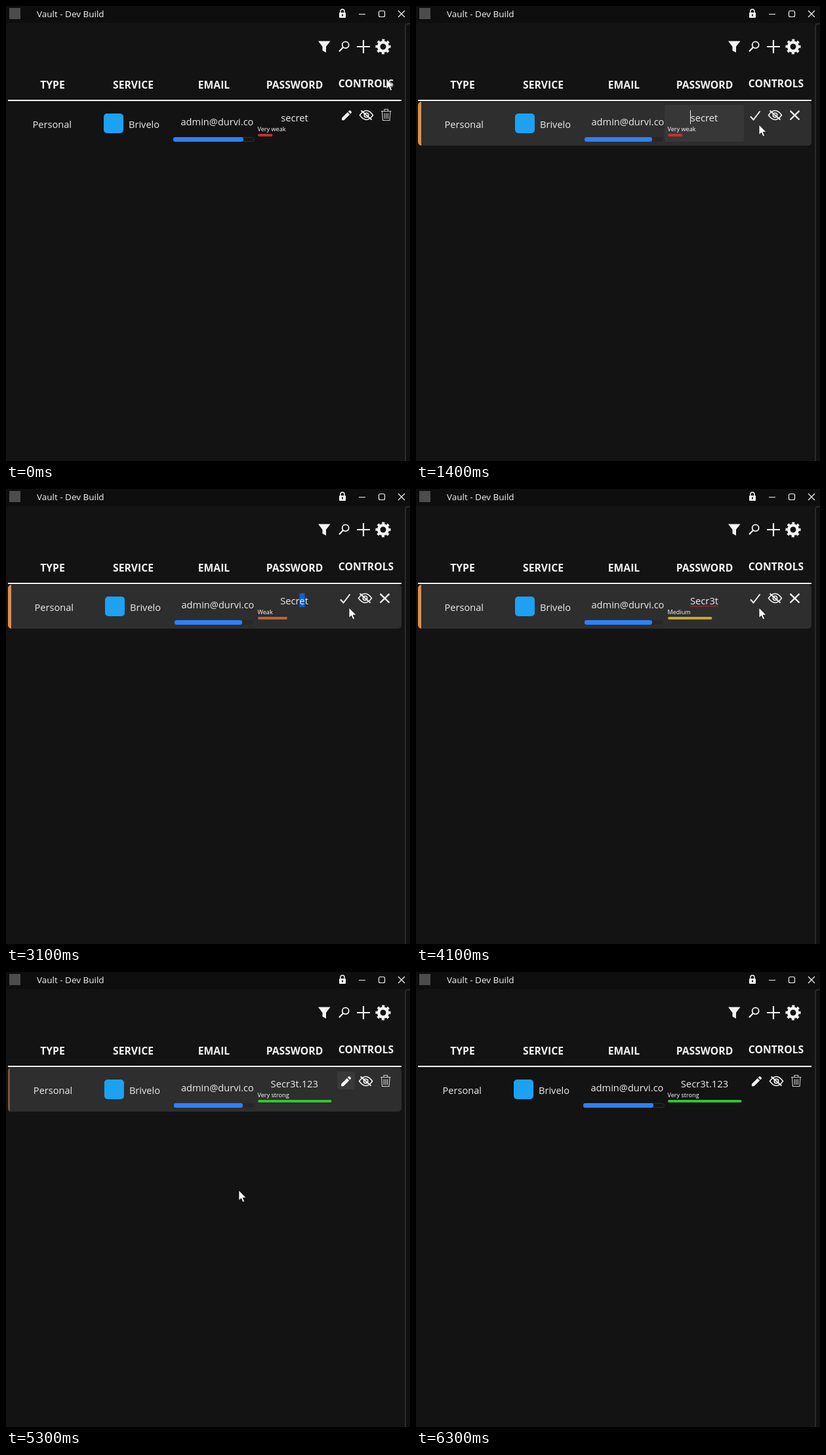
An HTML page for the animation above (6500 ms loop, 616 px wide and 694 px high).

```html
<!DOCTYPE html>
<html lang="en">
<head>
<meta charset="utf-8">
<title>Vault</title>
<style>
html, body { margin: 0; width: 100%; height: 100%; overflow: hidden; background: #131313; }
svg { display: block; width: 616px; height: 694px; font-family: "Open Sans", "Noto Sans", sans-serif; font-size: 14.6px; fill: #ececec; }
.head { font-weight: 700; font-size: 15.7px; fill: #f4f4f4; text-anchor: middle; }
.line { fill: none; stroke: #f4f4f4; }
.thin { fill: none; stroke: #cfcfcf; stroke-width: 1.1; }
</style>
</head>
<body>
<svg viewBox="0 0 616 694" xmlns="http://www.w3.org/2000/svg">
  <defs>
    <linearGradient id="blue" x1="0" y1="0" x2="1" y2="1">
      <stop offset="0" stop-color="#3b74e8"/><stop offset="1" stop-color="#0d45b8"/>
    </linearGradient>
    <clipPath id="cell"><rect x="255" y="160" width="124" height="36"/></clipPath>
  </defs>
  <rect width="616" height="694" fill="#131313"/>
  <rect width="616" height="26" fill="#0e0e0e"/>
  <rect x="609" y="27" width="14" height="690" rx="4" fill="#101010" stroke="#2a2a2a" stroke-width="2"/>

  <!-- title bar -->
  <rect x="5" y="3" width="17" height="17" fill="#4c4c4c"/>
  <text id="title" x="47" y="17" font-size="13.5" fill="#f4f4f4"></text>
  <path class="line" stroke-width="1.5" d="M510 11V8a3 3 0 0 1 6 0V11"/>
  <rect x="508" y="10" width="10" height="8" rx="1" fill="#f4f4f4"/>
  <path d="M513 12.5v3" stroke="#0e0e0e" stroke-width="1.8"/>
  <path class="line" stroke-width="1.2" d="M538 12.5H548M598 7l10 10m0-10l-10 10"/>
  <rect class="line" x="568.5" y="7.5" width="9" height="9" rx="2" stroke-width="1.2"/>

  <!-- toolbar -->
  <path fill="#f4f4f4" d="M476 53.5H494.5L488 62V71L482.5 68V62Z"/>
  <circle class="line" cx="517.7" cy="59.3" r="5" stroke-width="1.8"/>
  <path class="line" stroke-width="2.2" d="M514 63L508 69.3M535 62H555M545 52V72"/>
  <circle class="line" cx="575" cy="62" r="6.8" stroke-width="4.6"/>
  <circle class="line" cx="575" cy="62" r="9.7" stroke-width="3.8" stroke-dasharray="3.81" transform="rotate(-11.2 575 62)"/>

  <!-- table head -->
  <g class="head">
    <text x="71" y="126">TYPE</text>
    <text x="194" y="126">SERVICE</text>
    <text x="317" y="126">EMAIL</text>
    <text x="440" y="126">PASSWORD</text>
    <text x="549" y="124">CONTROLS</text>
  </g>
  <rect x="3" y="143" width="600" height="2" fill="#fff"/>

  <!-- row -->
  <g id="hover">
    <rect x="3" y="146" width="600" height="67" rx="5" fill="#2e2e2e"/>
    <path id="edge" fill="#d98f52"/>
  </g>
  <rect id="field" x="379" y="151" width="121" height="56" rx="4" fill="#373737"/>
  <text id="type" y="186">Personal</text>
  <g id="service">
    <rect x="149" y="164" width="30" height="30" rx="5" fill="#1da1f2"/>
    <text x="187" y="186">Brivelo</text>
  </g>
  <g clip-path="url(#cell)"><text id="mail" y="182">admin@durvi.co</text></g>
  <rect id="track" y="200.5" height="6" rx="3"/>
  <rect id="fill" y="200" height="7" rx="3" fill="#2e80fa"/>
  <rect id="pick" y="159" height="21" fill="#0c62d4"/>
  <text id="pass" y="176" font-size="14.8" text-anchor="middle"></text>
  <path id="wavy" d="M418 178.7H461" stroke="#b5202c" stroke-width="1.3"/>
  <rect id="caret" y="159" width="1" height="21" fill="#f4f4f4"/>
  <text id="label" x="383.5" y="191" font-size="9.1" font-weight="500" fill="#fff"></text>
  <rect id="power" x="384" y="195" height="4" rx="2"/>

  <!-- row controls -->
  <g id="tools">
    <rect id="press" x="506" y="152" width="27" height="27" rx="4" fill="#393939"/>
    <path class="line" stroke-width="1.6" d="M539.5 166.5Q549.5 152.5 559.5 166.5Q549.5 180.5 539.5 166.5Z"/>
    <circle class="line" cx="549.5" cy="166.5" r="3.2" stroke-width="1.6"/>
    <path class="line" stroke-width="1.8" d="M541.5 159.5L557.5 173.5"/>
    <g id="view">
      <path fill="#f6f6f6" d="M512 174.2V170.8L520.8 162L524.2 165.4L515.4 174.2ZM521.8 161L523.4 159.4Q524.2 158.8 525 159.4L526.8 161.2Q527.4 162 526.8 162.8L525.2 164.4Z"/>
      <path class="thin" d="M572 160.5H587.5M577 160V157.5H582.5V160M573.5 161L574.5 174.5H585L586 161M577.2 163.5V172M579.8 163.5V172M582.4 163.5V172"/>
    </g>
    <g id="edit" class="line">
      <path stroke-width="2" d="M512 168.5L516.5 173.5L526.5 160.5"/>
      <path stroke-width="2.4" d="M572.5 159.8L586.5 173.5M586.5 159.8L572.5 173.5"/>
    </g>
  </g>

  <g id="save">
    <rect x="20" y="646" width="100" height="30" rx="4" fill="url(#blue)"/>
    <text x="70" y="665.5" text-anchor="middle" font-family="Liberation Sans, Arial, sans-serif" font-size="13.3" fill="#e4ebfa">Save</text>
  </g>
  <path id="arrow" d="M0 0V15.5L3.6 12.2L6 18L8.6 17L6.2 11.3H11Z" fill="#fff" stroke="#111" stroke-width=".8"/>
  <path id="beam" class="line" stroke-width="1.2" d="M-3 -8H3M0 -8V8M-3 8H3"/>
</svg>
<script>
const LOOP = 6500, STEP = 100;
const el = {};
document.querySelectorAll('[id]').forEach(n => el[n.id] = n);

const set = (n, o) => { for (const k in o) n.setAttribute(k, o[k]); };
const show = (n, on) => set(n, { visibility: on ? 'visible' : 'hidden' });
const move = (n, x, y = 0) => set(n, { transform: `translate(${x} ${y})` });
const within = (t, a, b) => t >= a && t < b;
const ramp = (t, a, b) => Math.min(1, Math.max(0, (t - a) / (b - a)));

// pointer trips between the places it visits
const home = { x: 580, y: 111 };
const trips = [
  { from: 0, to: 400, x: 520, y: 170 },     // pencil
  { from: 700, to: 1100, x: 391, y: 170 },  // password field
  { from: 1200, to: 1400, x: 523, y: 181 }, // below the check mark
  { from: 4800, to: 5000, x: 521, y: 170 }, // check mark
  { from: 5100, to: 5300, x: 355, y: 333 },
  { from: 5300, to: 5600, x: 63, y: 597 },
  { from: 5600, to: 5800, x: 64, y: 655 },  // save button
  { from: 5900, to: 6200, x: -20, y: 630 }
];

function pointer(t) {
  return trips.reduce((p, s) => {
    const f = ramp(t, s.from, s.to);
    return { x: p.x + (s.x - p.x) * f, y: p.y + (s.y - p.y) * f };
  }, home);
}

// what is in the password field, with its caret or selected letter
const edits = [
  { at: 0, word: 'secret' },
  { at: 1200, word: 'secret', caret: 0 },
  { at: 1800, word: 'secret', pick: 0 },
  { at: 1900, word: 'Secret', caret: 1 },
  { at: 2400, word: 'Secret' },
  { at: 2600, word: 'Secret', caret: 3 },
  { at: 2700, word: 'Secret', pick: 4 },
  { at: 3200, word: 'Secr3t', caret: 5 },
  { at: 3600, word: 'Secr3t' },
  { at: 4200, word: 'Secr3t.1', caret: 8 },
  { at: 4300, word: 'Secr3t.123', caret: 10 },
  { at: 4900, word: 'Secr3t.123' }
];
const grades = ['Very weak', 'Weak', 'Medium', 'Strong', 'Very strong'];

// one point for each kind of character, one for length
const score = w => [/[a-z]/, /[A-Z]/, /\d/, /\W/, /.{10}/].filter(r => r.test(w)).length;

const meter = t => edits.reduce((sum, e, i) => {
  const gain = score(e.word) - (i ? score(edits[i - 1].word) : 0);
  return sum + gain * (i ? ramp(t, e.at - 100, e.at + 100) : 1);
}, 0);

function letterX(i) {
  const n = el.pass.getNumberOfChars();
  return i < n ? el.pass.getStartPositionOfChar(i).x : el.pass.getEndPositionOfChar(n - 1).x;
}

function drawRow(t) {
  const accent = .45 * (ramp(t, 100, 300) - ramp(t, 5300, 5600)) + .55 * (ramp(t, 600, 900) - ramp(t, 5100, 5300));
  const glow = ramp(t, 100, 400) - ramp(t, 5300, 5600);
  const editing = within(t, 700, 5200);
  const right = 3 + 5 * Math.min(1, accent * 1.25);

  set(el.hover, { opacity: glow });
  set(el.edge, { d: `M${right} 146V213Q3 212 3 207V152Q3 147 ${right} 146Z`, opacity: accent });
  set(el.type, { x: 40.5 + 3 * accent });
  move(el.service, 2 * accent);
  set(el.mail, { x: 266.5 + accent });
  set(el.track, {
    x: 255.5 + 2 * accent, width: 123 - 4 * accent,
    stroke: glow > .5 ? '#292929' : '#303030', fill: glow > .5 ? '#272727' : '#161616'
  });
  set(el.fill, { x: 255 + 2 * accent, width: 107 - 4 * accent });
  set(el.pass, { x: 440 - .5 * accent });

  move(el.tools, -2 * accent);
  show(el.view, !editing);
  show(el.edit, editing);
  show(el.press, within(t, 300, 800) || within(t, 4900, 5400));
  show(el.field, within(t, 900, 1800));
}

function drawPassword(t) {
  const { word, caret = -1, pick = -1 } = edits.filter(e => e.at <= t).pop();
  const level = meter(t);

  el.pass.textContent = word;
  show(el.wavy, within(t, 3600, 4200));
  show(el.caret, caret >= 0);
  if (caret >= 0) set(el.caret, { x: Math.floor(letterX(caret)) });
  show(el.pick, pick >= 0 || t === 3100);
  if (pick >= 0) set(el.pick, { x: letterX(pick), width: letterX(pick + 1) - letterX(pick) });

  el.label.textContent = grades[score(word) - 1];
  const hue = 120 * ((level - 1) / 4) ** 1.3;
  set(el.power, { width: 22.5 * level, fill: `hsl(${hue} 62% 48%)` });
}

function draw(t) {
  drawRow(t);
  drawPassword(t);
  el.title.textContent = within(t, 5400, 5900) ? 'Vault* - Dev Build' : 'Vault - Dev Build';
  move(el.save, 125 * (ramp(t, 5300, 5600) - ramp(t, 5900, 6200) - 1));

  const { x, y } = pointer(t);
  const overText = within(t, 900, 1300);
  show(el.arrow, !overText);
  show(el.beam, overText);
  move(overText ? el.beam : el.arrow, Math.round(x), Math.round(y));
}

const start = performance.now();
function tick() {
  const t = (performance.now() - start) % LOOP;
  draw(Math.floor(t / STEP) * STEP);
  requestAnimationFrame(tick);
}
tick();
</script>
</body>
</html>
```
